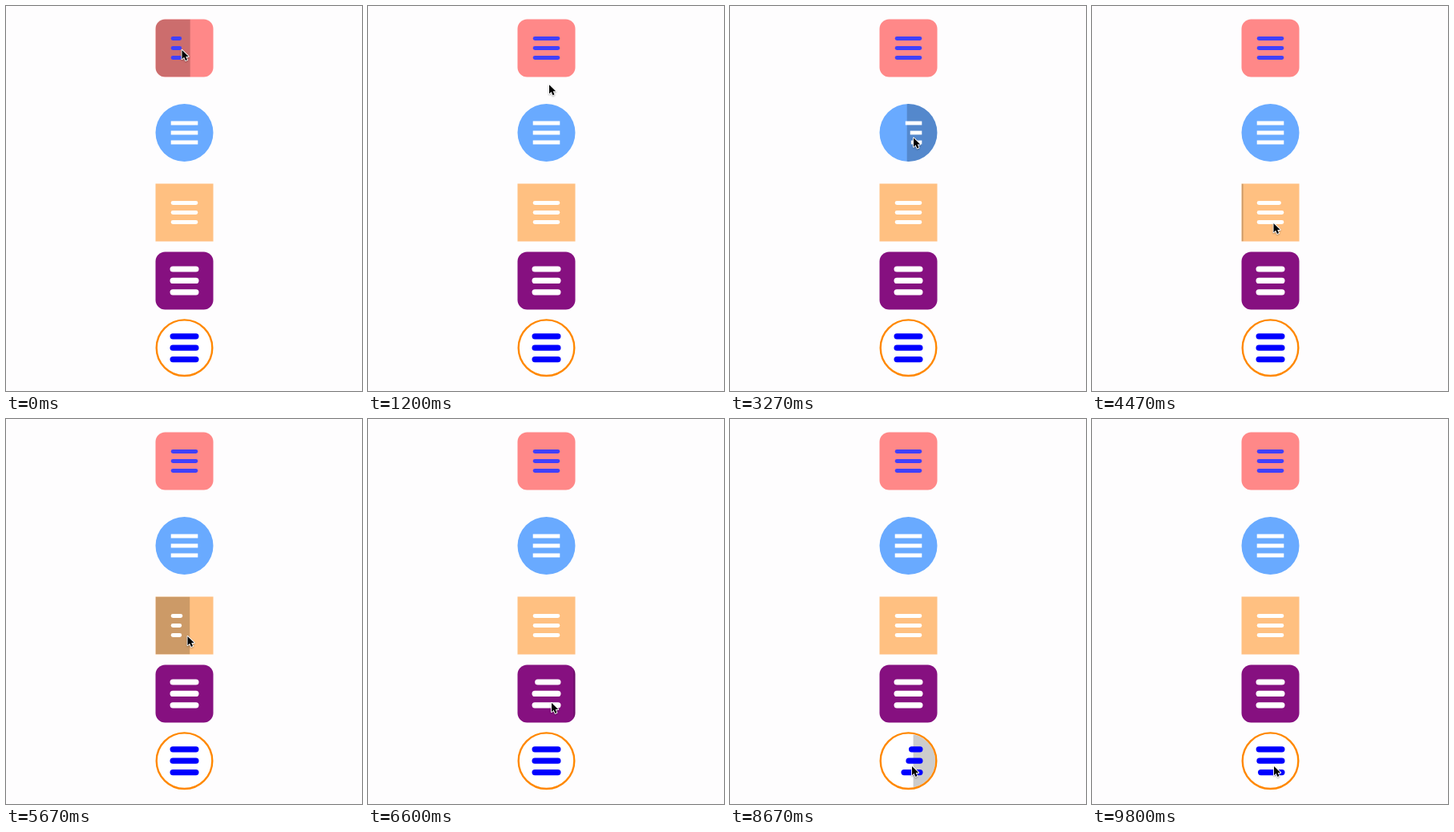
Animation of 444x480 px, one loop 9870 ms. Source, as an HTML page with a canvas:

```html
<!DOCTYPE html>
<html lang="en">
<head>
<meta charset="utf-8">
<title>Sidebar toggle buttons</title>
<style>
html, body { margin: 0; width: 100%; height: 100%; overflow: hidden; background: #fefdfe; }
canvas { display: block; }
</style>
</head>
<body>
<canvas id="stage" width="444" height="480"></canvas>
<script>
const LOOP = 9870, SIZE = 72, LEFT = 186.5;
const PANEL_MS = 330, BAR_MS = 360, STAGGER = 55;
const ctx = document.getElementById('stage').getContext('2d');

const thin = { w: 33.6, h: 4.8, pitch: 12 };
const thick = { w: 36, h: 7.2, pitch: 14.4 };

// open and close are the click times; side is where the panel sits
const buttons = [
  { y: 16.5, r: 12, fill: '#ff8888', ink: '#4040ff', bars: thin, round: true, side: 'left', open: -1000, close: 40 },
  { y: 122, r: 36, fill: '#69aaff', ink: '#fff', bars: thin, round: false, side: 'right', open: 1900, close: 3190 },
  { y: 221.5, r: 0, fill: '#ffc081', ink: '#fff', bars: thin, round: true, side: 'left', open: 4420, close: 5645 },
  { y: 306.4, r: 12, fill: '#861080', ink: '#fff', bars: thick, round: true, side: 'right', open: 6550, close: 7560 },
  { y: 390.2, r: 36, fill: '#fff', ink: '#0000ff', bars: thick, round: true, side: 'right', open: 8470, close: 9475, border: 2.4 }
];

// pointer path: time, x, y
const path = [
  [1030, 219.5, 55], [1200, 226, 98], [1530, 231, 155], [1930, 231, 155], [2200, 229, 164.5],
  [3680, 229, 164.5], [4130, 226.5, 271], [6050, 226.5, 271], [6400, 229, 354],
  [7980, 229, 354], [8330, 227, 433]
];

function bezier(x1, y1, x2, y2) {
  const at = (a, b, s) => 3 * a * s * (1 - s) ** 2 + 3 * b * s * s * (1 - s) + s ** 3;
  return x => {
    if (x <= 0) return 0;
    if (x >= 1) return 1;
    let lo = 0, hi = 1;
    for (let i = 0; i < 24; i++) {
      const mid = (lo + hi) / 2;
      if (at(x1, x2, mid) < x) lo = mid; else hi = mid;
    }
    return at(y1, y2, lo);
  };
}
const ease = bezier(.25, .1, .25, 1);
const easeInOut = bezier(.42, 0, .58, 1);

function openness(b, t, ms, delay, curve) {
  const progress = start => curve((t - start - delay) / ms);
  return progress(b.open) - progress(b.close);
}

function box(x, y, w, h, r) {
  ctx.beginPath();
  ctx.roundRect(x, y, w, h, r);
}

function drawButton(b, t) {
  const inset = b.border || 0, inner = SIZE - 2 * inset;
  const x = LEFT + inset, y = b.y + inset;
  const toRight = b.side === 'right';

  ctx.save();
  box(x, y, inner, inner, Math.max(0, b.r - inset));
  ctx.fillStyle = b.fill;
  ctx.fill();
  ctx.clip();
  const panel = .6 * inner * openness(b, t, PANEL_MS, 0, easeInOut);
  ctx.fillStyle = 'rgba(0,0,0,.2)';
  ctx.fillRect(toRight ? x + inner - panel : x, y, panel, inner);
  ctx.restore();

  if (inset) {
    box(LEFT + inset / 2, b.y + inset / 2, SIZE - inset, SIZE - inset, b.r);
    ctx.lineWidth = inset;
    ctx.strokeStyle = '#ff8800';
    ctx.stroke();
  }

  const { w, h, pitch } = b.bars;
  ctx.fillStyle = b.ink;
  for (let i = 0; i < 3; i++) {
    const len = w * (1 - .6 * openness(b, t, BAR_MS, i * STAGGER, ease));
    const bx = LEFT + (SIZE - w) / 2 + (toRight ? w - len : 0);
    box(bx, b.y + SIZE / 2 + (i - 1) * pitch - h / 2, len, h, b.round ? h / 2 : 0);
    ctx.fill();
  }
}

function pointerAt(t) {
  const next = path.findIndex(p => p[0] > t);
  if (next === 0) return path[0].slice(1);
  if (next < 0) return path[path.length - 1].slice(1);
  const [t0, x0, y0] = path[next - 1], [t1, x1, y1] = path[next];
  const k = (t - t0) / (t1 - t0);
  return [x0 + (x1 - x0) * k, y0 + (y1 - y0) * k];
}

const arrow = new Path2D('M0 0V11.2L2.6 8.8L4.5 13L6.5 12.1L4.7 8H8.2Z');

function drawPointer(t) {
  ctx.save();
  ctx.translate(...pointerAt(t));
  ctx.lineWidth = 1.8;
  ctx.lineJoin = 'round';
  ctx.strokeStyle = '#fff';
  ctx.shadowColor = 'rgba(0,0,0,.3)';
  ctx.shadowBlur = 2;
  ctx.shadowOffsetY = 1;
  ctx.stroke(arrow);
  ctx.shadowColor = 'transparent';
  ctx.fillStyle = '#000';
  ctx.fill(arrow);
  ctx.restore();
}

const began = performance.now();
function frame() {
  const t = (performance.now() - began) % LOOP;
  ctx.clearRect(0, 0, 444, 480);
  buttons.forEach(b => drawButton(b, t));
  drawPointer(t);
  requestAnimationFrame(frame);
}
frame();
</script>
</body>
</html>
```
